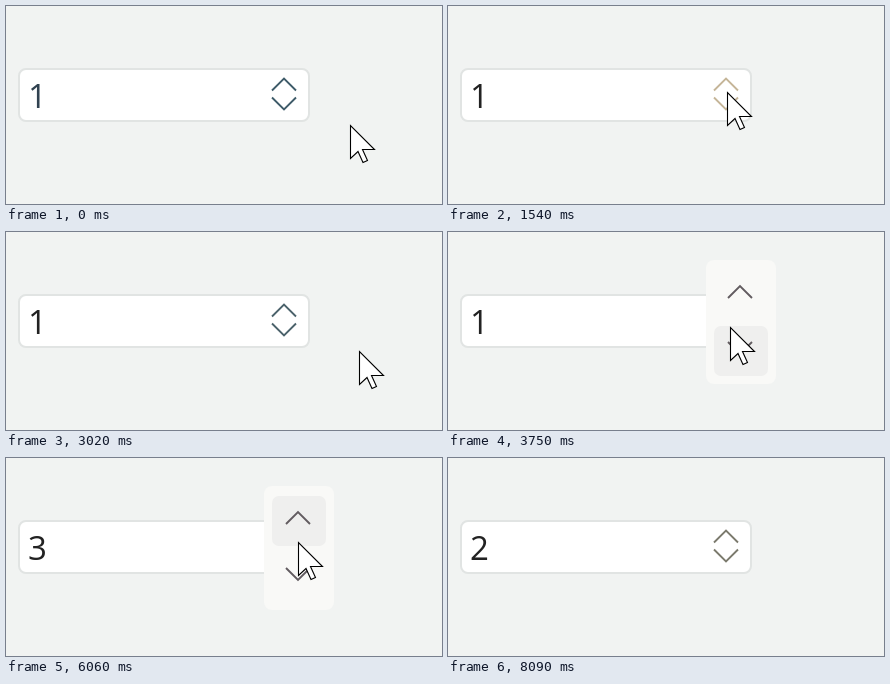
An HTML page for the animation above (8720 ms loop, 436 by 198 pixels).

```html
<!DOCTYPE html>
<html lang="en">
<head>
<meta charset="utf-8">
<title>Number box</title>
<style>
  html, body { margin: 0; width: 100%; height: 100%; overflow: hidden; background: #f1f3f2; }
  svg { display: block; width: 436px; height: 198px; }
  text { font: 33px "Open Sans", "Noto Sans", sans-serif; }
  .chevron { fill: none; stroke-width: 1.9; }
</style>
</head>
<body>
<svg viewBox="0 0 436 198">
  <rect x="13" y="63" width="290" height="52" rx="7" fill="#fff" stroke="#e1e4e3" stroke-width="2"/>
  <text id="value" x="22" y="102">1</text>
  <path id="compact" class="chevron" stroke-width="2.2" d="M266 84.5L278 72.5L290 84.5M266 91.5L278 103.5L290 91.5"/>
  <g id="popup">
    <rect x="258" y="28" width="70" height="124" rx="8" fill="#f9f9f7"/>
    <rect id="upBack" x="266" y="38" width="54" height="50" rx="7"/>
    <rect id="downBack" x="266" y="94" width="54" height="50" rx="7"/>
    <path id="up" class="chevron" d="M280 66L292 54L304 66"/>
    <path id="down" class="chevron" d="M280 110L292 122L304 110"/>
  </g>
  <g id="cursor">
    <path d="M.5 .5V33.5L8 26.5L13 37.5L17.5 35.5L12.5 24.5H24.5Z" fill="#fff" stroke="#000" stroke-width="1.1"/>
  </g>
  <g id="busy" fill="none" stroke-width="7.5">
    <circle cx="320.5" cy="118.5" r="11.7" fill="#f4f4f3" stroke="#2b92ec"/>
    <path id="arc" d="M310.4 124.4A11.7 11.7 0 0 1 312.2 110.2" stroke="#36c2f6"/>
  </g>
</svg>
<script>
const LOOP = 8720;
const $ = id => document.getElementById(id);
const set = (id, name, value) => $(id).setAttribute(name, value);
const clamp = x => Math.max(0, Math.min(1, x));
const ramp = (t, a, b) => clamp((t - a) / (b - a));
const within = (t, a, b) => t >= a && t < b;
const smooth = x => x * x * (3 - 2 * x);

// Each move: start, end, from, bend point, to.
const moves = [
  [410, 900, [344, 119], [330, 134], [279, 86]],
  [2620, 3020, [279, 86], [322, 98], [353, 119]],
  [3300, 3820, [353, 119], [318, 108], [278, 94]],
  [4140, 4420, [278, 94], [286, 80], [290, 64]],
  [5870, 6320, [290, 64], [293, 90], [292, 118]],
  [7250, 7590, [292, 118], [262, 130], [226, 150]]
];

function pointer(t) {
  if (t >= 7970) {
    const k = ramp(t, 7970, 8090);
    return [226 + 44 * k, 150 + 50 * k];
  }
  const move = moves.filter(m => t >= m[0]).pop() || moves[0];
  const [a, b, from, bend, to] = move;
  const k = smooth(ramp(t, a, b)), j = 1 - k;
  return from.map((p, i) => j * j * p + 2 * j * k * bend[i] + k * k * to[i]);
}

function mix(a, b, k) {
  return `rgb(${a.map((v, i) => Math.round(v + (b[i] - v) * k))})`;
}

function compactColor(t) {
  if (t < 1330) return mix([62, 91, 105], [82, 95, 98], ramp(t, 430, 900));
  if (t < 2200) return mix([82, 95, 98], [197, 181, 152], ramp(t, 1330, 1540));
  return t < 4000 ? "#4b626b" : "#7b7a6d";
}

function popupOpacity(t) {
  if (t < 2640) return ramp(t, 2080, 2170);
  if (t < 3500) return 1 - ramp(t, 2790, 2850);
  if (t < 7000) return ramp(t, 3640, 3730);
  return 1 - ramp(t, 7430, 7490);
}

function drawButton(name, hover, pressed) {
  set(name + "Back", "fill", pressed ? "#f4f3f2" : hover ? "#efefee" : "none");
  set(name, "stroke", pressed ? "#969092" : "#625c60");
}

function draw(t) {
  const [x, y] = pointer(t).map(Math.round);
  const inside = x >= 266 && x < 320;
  $("value").textContent = t < 4590 ? 1 : within(t, 5430, 6590) ? 3 : 2;
  set("value", "fill", mix([48, 66, 80], [34, 34, 34], ramp(t, 430, 900)));
  set("compact", "stroke", compactColor(t));
  set("popup", "opacity", popupOpacity(t));
  drawButton("up", inside && y >= 38 && y < 88,
    within(t, 4590, 5130) || within(t, 5430, 5890));
  drawButton("down", inside && y >= 94 && y < 144, within(t, 6590, 7050));
  set("cursor", "transform", `translate(${x} ${y})`);
  set("cursor", "visibility", t < 8090 ? "visible" : "hidden");
  set("busy", "visibility", within(t, 6930, 7100) ? "visible" : "hidden");
  set("arc", "transform", `rotate(${t < 7000 ? 0 : 40} 320.5 118.5)`);
}

function tick() {
  draw(performance.now() % LOOP);
  requestAnimationFrame(tick);
}
tick();
</script>
</body>
</html>
```
